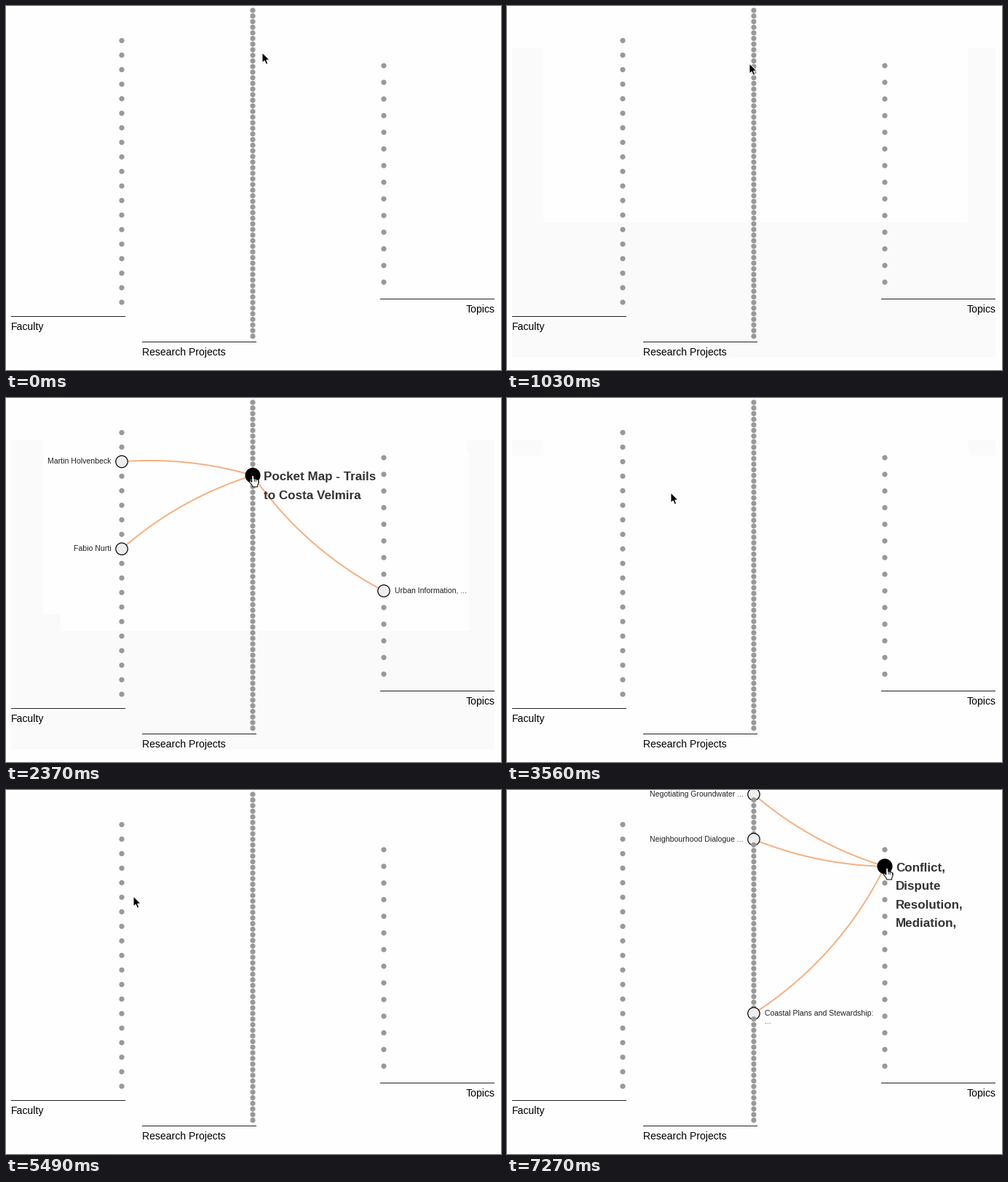
A matplotlib script for the animation above (7870 ms loop, 680 px wide and 500 px high).

```python
import numpy as np
import matplotlib.pyplot as plt
from matplotlib.animation import FuncAnimation
from matplotlib.patches import Polygon, Rectangle

W, H, DPI = 680, 500, 100
LOOP, FRAMES = 7870, 262
INTERVAL = LOOP / FRAMES
PT = 72 / DPI
PAPER, TINT, GREY, INK, ORANGE = "#fefefe", "#fafafa", "#999999", "#333333", "#f4b183"

plt.rcParams["font.family"] = "Liberation Sans"
plt.rcParams["toolbar"] = "None"
fig = plt.figure(figsize=(W / DPI, H / DPI), dpi=DPI, facecolor=PAPER)
ax = fig.add_axes([0, 0, 1, 1])
ax.set(xlim=(0, W), ylim=(H, 0))
ax.axis("off")

# Columns: x, first y, spacing, number of nodes
FACULTY, PROJECT, TOPIC = 0, 1, 2
COLUMNS = [(159, 47.5, 19.97, 19), (339, 6, 7.717, 59), (519, 82, 22.87, 14)]
OFFSETS = np.cumsum([0] + [c[3] for c in COLUMNS])
nodes = np.array([(x, y + i * gap) for x, y, gap, n in COLUMNS for i in range(n)])


def node_id(col, i):
    return OFFSETS[col] + i


def write(x, y, text, size, leading=0, **style):
    return [ax.text(x, y + i * leading, line, fontsize=size * PT, va="baseline",
                    zorder=5, parse_math=False, **style)
            for i, line in enumerate(text.split("\n"))]


def arc(p, q, radius=500):
    """Clockwise circular arc from p to q."""
    half = np.hypot(*(q - p)) / 2
    along = (q - p) / (2 * half)
    normal = np.array([along[1], -along[0]])
    t = np.linspace(-half, half, 40)
    rise = np.sqrt(radius**2 - t**2) - np.sqrt(radius**2 - half**2)
    return ((p + q) / 2 + np.outer(t, along) + np.outer(rise, normal)).T


class Hover:
    """One highlighted node with its title, links and neighbour labels."""

    def __init__(self, col, i, title, links):
        self.artists = []
        self.radii = np.full(len(nodes), 3.6)
        self.faces = [GREY] * len(nodes)
        self.edges = np.zeros(len(nodes))
        main = node_id(col, i)
        self.radii[main], self.faces[main] = 10.5, "black"
        self.label(main, title, col != FACULTY, big=True)
        for other, j, text, *right in links:
            k = node_id(other, j)
            self.radii[k], self.faces[k], self.edges[k] = 8.2, "#eeeeee", 1.2
            self.label(k, text, other == TOPIC or bool(right))
            # links run from the outer column to the project
            start, end = (k, main) if col == PROJECT else (main, k)
            self.artists += ax.plot(*arc(nodes[start], nodes[end]), color=ORANGE,
                                    lw=2 * PT, zorder=2)
        self.show(False)

    def label(self, k, text, on_right, big=False):
        x, y = nodes[k]
        x += 15.3 if on_right else -14.5
        ha = "left" if on_right else "right"
        if big:
            self.artists += write(x, y + 7, text, 17, 25.2, ha=ha, color=INK, weight="bold")
        else:
            self.artists += write(x, y + 3, text, 10.5, 11.5, ha=ha, color="#222222")

    def show(self, on):
        for a in self.artists:
            a.set_visible(on)


MAPPER = (FACULTY, 5, "Norah Fallowin")
URBAN = (TOPIC, 8, "Urban Information, ...")
EDUCATION = (TOPIC, 9, "Education")
HOVERS = {
    None: None,
    "dialogue": Hover(PROJECT, 8, "Neighbourhood\nDialogue in Water\nPlanning", [
        (FACULTY, 4, "Catherine Hollowby"),
        (TOPIC, 1, "Conflict, Dispute ..."), EDUCATION]),
    "street": Hover(PROJECT, 10, "Shared Street\nMapping Studio:", [MAPPER, URBAN]),
    "academy": Hover(
        PROJECT, 11, "Foundation\nProgrammes for\nthe Delta Academy\nof Waters", [
            (FACULTY, 6, "Devi Korath"), (FACULTY, 7, "Bernard Quolm"),
            EDUCATION, (TOPIC, 10, "History and Theory ...")]),
    "ferries": Hover(PROJECT, 12, "Mapped Ferries", [MAPPER, URBAN]),
    "trails": Hover(PROJECT, 13, "Pocket Map - Trails\nto Costa Velmira", [
        (FACULTY, 2, "Martin Holvenbeck"), (FACULTY, 8, "Fabio Nurti"), URBAN]),
    "mapper": Hover(FACULTY, 5, "Norah\nFallowin", [
        (PROJECT, 6, "Town Sums: Fenley, ..."),
        (PROJECT, 10, "Shared Street Mapping Studio: ..."),
        (PROJECT, 12, "Mapped Ferries")]),
    "conflict": Hover(TOPIC, 1, "Conflict,\nDispute\nResolution,\nMediation,", [
        (PROJECT, 0, "Negotiating Groundwater ..."),
        (PROJECT, 8, "Neighbourhood Dialogue ..."),
        (PROJECT, 39, "Coastal Plans and Stewardship:\n...", True)]),
}

# Pointer steps: start in ms, tip x, tip y, hovered item
STEPS = [
    (0, 352, 64, None), (150, 346, 65, None),
    (290, 340, 67, "dialogue"), (440, 338, 69, "dialogue"),
    (890, 334, 76, None), (1030, 333, 79, None), (1180, 334, 81, None),
    (1330, 337, 83, "street"), (1480, 338, 86, "street"),
    (1930, 338, 95, "academy"),
    (2080, 338, 99, "ferries"), (2220, 338, 103, "ferries"),
    (2370, 339, 106, "trails"),
    (3260, 315, 108, None), (3410, 270, 118, None), (3560, 225, 130, None),
    (3700, 190, 139, None), (3850, 174, 143, None), (4000, 170, 145, None),
    (4290, 162, 147, "mapper"), (4440, 158, 148, "mapper"),
    (5490, 175, 146, None), (5640, 235, 138, None), (5790, 310, 128, None),
    (5930, 430, 115, None), (6080, 515.5, 107, None),
    (6220, 519, 107, "conflict"), (6370, 522, 107, "conflict"),
]

# Faint background areas: from, to, left, top, right, bottom, colour
AREAS = [
    (290, 5490, 7, 57, 671, 482, TINT),
    (890, 5490, 50, 57, 633, 297, PAPER),
    (1930, 5490, 75, 72, 636, 320, PAPER),
    (3260, 5490, 7, 79, 672, 482, PAPER),
    (4290, 5490, 74, 43, 348, 180, TINT),
]
areas = []
for start, end, x0, y0, x1, y1, colour in AREAS:
    patch = ax.add_patch(Rectangle((x0, y0), x1 - x0, y1 - y0, fc=colour, lw=0, zorder=0))
    areas.append((start, end, patch))

for x0, x1, y, name, ha in [(7, 164, 426.5, "Faculty", "left"),
                            (187, 344, 461.5, "Research Projects", "left"),
                            (514, 671, 402.5, "Topics", "right")]:
    ax.plot([x0, x1], [y, y], color="#222222", lw=PT, zorder=1,
            solid_capstyle="butt", snap=False)
    write(x0 if ha == "left" else x1 + 1, y + 18.5, name, 14, ha=ha, color="black")

dots = ax.scatter(*nodes.T, s=(7.2 * PT) ** 2, c=GREY, edgecolors="black",
                  linewidths=0, zorder=3, snap=False)

ARROW = np.array([(0, 0), (0, 14), (3.2, 11.2), (5.4, 16.2), (7.8, 15.2),
                  (5.7, 10.3), (10, 10)])
HAND = np.array([(-1.3, 1), (0, 0), (1.4, 1), (1.6, 5), (3.6, 4.8), (4.2, 5.6),
                 (6, 5.6), (6.6, 6.5), (8, 7), (8.2, 10.5), (6.8, 13), (6.6, 16),
                 (0, 16), (-1.5, 13), (-4.8, 9), (-4.4, 7.6), (-3, 7.8), (-1.3, 9.5)])
FINGERS = np.array([(1.6, 5), (1.6, 8), (np.nan, np.nan), (4.2, 5.6), (4.2, 8.4),
                    (np.nan, np.nan), (6.6, 6.5), (6.6, 9)])
arrow = ax.add_patch(Polygon(ARROW, fc="black", ec="white", lw=PT, zorder=8))
hand = ax.add_patch(Polygon(HAND, fc="white", ec="black", lw=PT, zorder=8))
fingers, = ax.plot(*FINGERS.T, color="black", lw=0.8 * PT, zorder=9)


def update(k):
    t = (k + 0.98) * INTERVAL
    _, x, y, key = [s for s in STEPS if s[0] <= t][-1]
    for start, end, patch in areas:
        patch.set_visible(start <= t < end)
    for name, hover in HOVERS.items():
        if hover:
            hover.show(name == key)

    hover = HOVERS[key]
    radii = hover.radii if hover else np.full(len(nodes), 3.6)
    dots.set_sizes((2 * radii * PT) ** 2)
    dots.set_facecolor(hover.faces if hover else GREY)
    dots.set_linewidth(hover.edges * PT if hover else 0)

    arrow.set_visible(not hover)
    hand.set_visible(bool(hover))
    fingers.set_visible(bool(hover))
    arrow.set_xy(ARROW + (x, y))
    hand.set_xy(HAND + (x, y))
    fingers.set_data(*(FINGERS + (x, y)).T)
    return []


anim = FuncAnimation(fig, update, frames=FRAMES, interval=INTERVAL,
                     init_func=lambda: update(0), repeat=True, repeat_delay=0,
                     blit=False)
plt.show()
```
